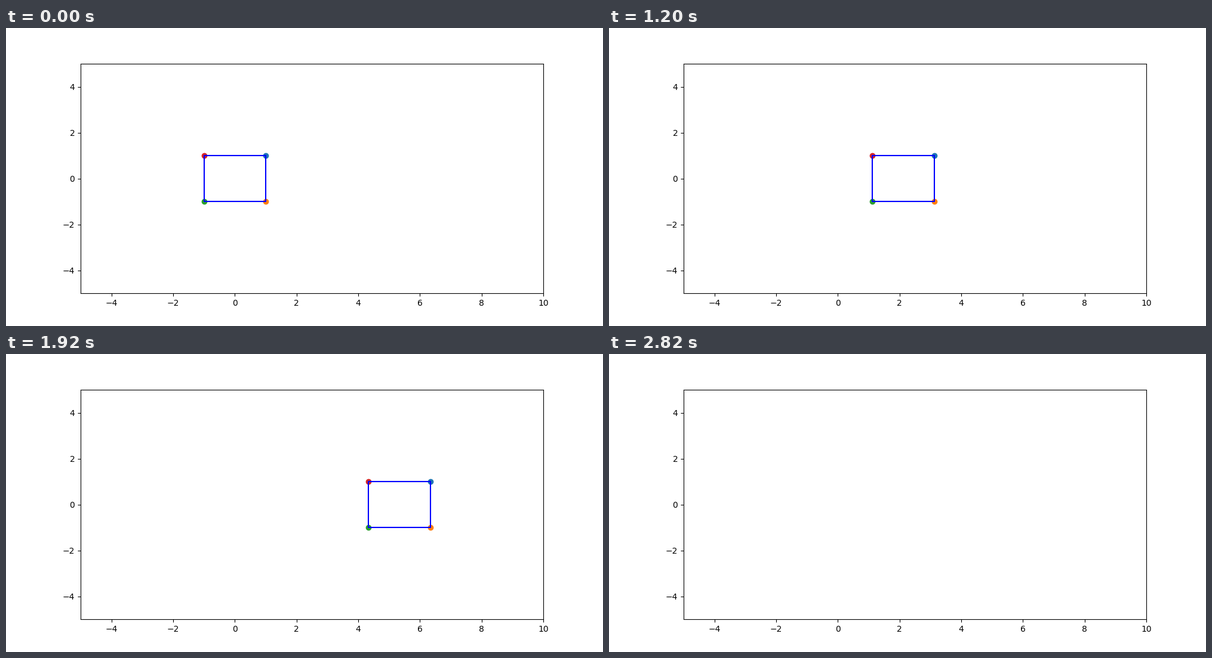
A matplotlib script for the animation above (6310 ms loop, 1000 px wide and 500 px high).

```python
import numpy as np
import matplotlib.pyplot as plt
from matplotlib.animation import FuncAnimation

LOOP_MS = 6310
FRAMES = 316
FRAMES_PER_STEP = 3      # the square moves about every 60 ms
DV = 10 / 99             # speed gained per step
DT = 0.1

corners = np.array([(1, 1), (1, -1), (-1, -1), (-1, 1)], dtype=float)

fig, ax = plt.subplots(figsize=(10, 5), dpi=100)
ax.set_xlim(-5, 10)
ax.set_ylim(-5, 5)

dots = [ax.scatter(x, y, color=f"C{i}") for i, (x, y) in enumerate(corners)]
outline, = ax.plot([], [], color="b", lw=1.5)


def shift(step):
    """Distance after uniformly accelerated steps."""
    return DV * DT * step * (step + 1) / 2


def update(frame):
    pts = corners + (shift(frame // FRAMES_PER_STEP), 0)
    for dot, p in zip(dots, pts):
        dot.set_offsets([p])
    outline.set_data(*np.vstack([pts, pts[:1]]).T)
    return [*dots, outline]


anim = FuncAnimation(fig, update, frames=FRAMES, interval=LOOP_MS / FRAMES,
                     repeat=True, repeat_delay=0, blit=False)
plt.show()
```
